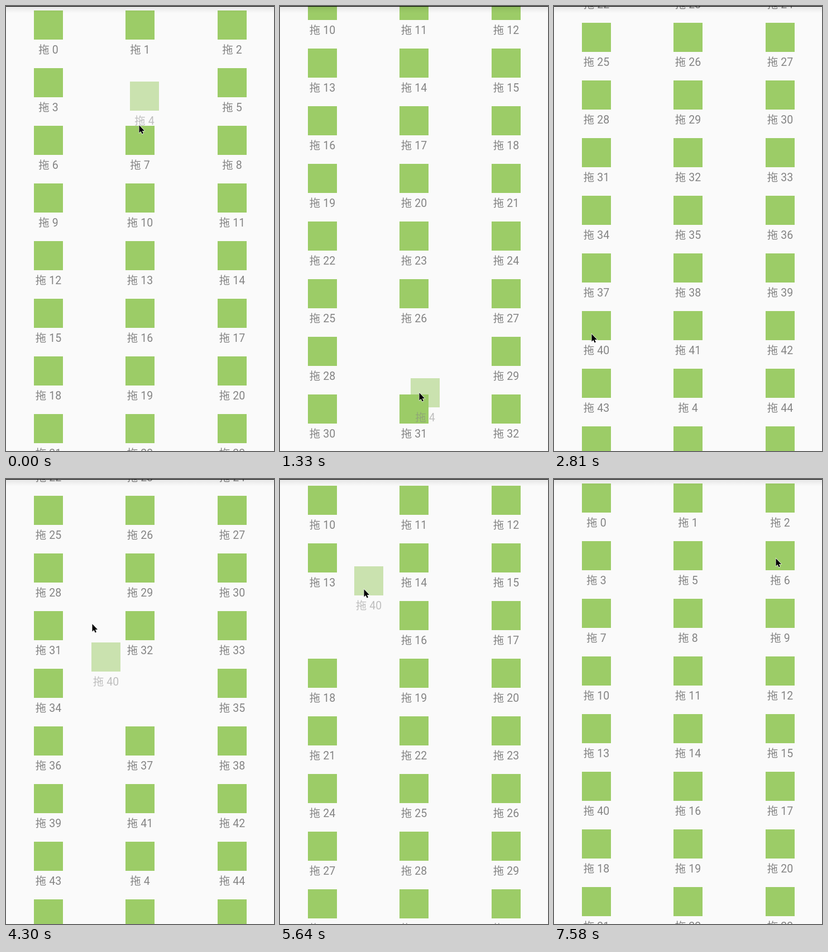
Recreate the animation shown at these times as an HTML page. Size 480 px wide and 795 px high, loop 8000 ms.

```html
<!DOCTYPE html>
<html lang="zh-CN">
<head>
<meta charset="utf-8">
<title>Drag grid</title>
<style>
  html, body { margin: 0; width: 100%; height: 100%; overflow: hidden; background: #fafafa; }
  #stage { position: relative; width: 480px; height: 795px; overflow: hidden; background: #fafafa; }
  .cell { position: absolute; left: 0; top: 0; width: 52px; height: 95px; }
  .cell::before { content: ""; position: absolute; left: 0; top: 8px; width: 52px; height: 52px; background: #9ccc67; }
  .cell span {
    position: absolute; left: -14px; top: 67px; width: 80px;
    font: 19.5px/24px Roboto, "Noto Sans CJK SC", "Noto Sans CJK", sans-serif;
    text-align: center; white-space: nowrap; color: #848484;
  }
  .ghost { opacity: .5; z-index: 1; }
  #bar {
    position: absolute; z-index: 2; left: 0; top: 0; width: 100%; height: 13px;
    background: linear-gradient(#000 1px, rgba(0,0,0,.25) 1px 2px, rgba(0,0,0,.08) 2px, rgba(0,0,0,.03) 8px, transparent);
  }
  #cursor { position: absolute; z-index: 3; left: 0; top: 0; overflow: visible; }
</style>
</head>
<body>
<div id="stage">
  <div id="bar"></div>
  <svg id="cursor" width="14" height="20">
    <path d="M.5 1V14.5L3.6 11.7L5.7 16.6L7.9 15.6L5.8 10.9H10Z" fill="#000" stroke="#fff" stroke-width="1.2" paint-order="stroke"/>
  </svg>
</div>
<script>
const LOOP = 8000, STEP = 148.3, LAST = 51, COUNT = 51;
const ROW = 103, COL = 164.5, LEFT = 50;
const stage = document.getElementById('stage');
const cursor = document.getElementById('cursor');

const linear = u => u;
const smooth = u => u * u * (3 - 2 * u);

// Chains moves { from, to, end } (in steps); each starts where the last one ended.
function chain(start, moves, ease) {
  return n => moves.reduce((pos, m) => {
    const u = Math.min(1, Math.max(0, (n - m.from) / (m.to - m.from)));
    return pos.map((v, i) => v + (m.end[i] - v) * ease(u));
  }, start);
}

const pointer = chain([237, 150], [
  { from: -1.6, to: 6, end: [249, 690] },
  { from: 15, to: 19, end: [67, 585] },
  { from: 26, to: 28, end: [170, 332] },
  { from: 28, to: 29.9, end: [141, 195] },
  { from: 35, to: 37, end: [150, 196] },
  { from: 44, to: 51, end: [397, 141] }
], smooth);

const scroll = chain([0], [
  { from: 5.3, to: 13.92, end: [802] },
  { from: 31.55, to: 38, end: [305] },
  { from: 38, to: 41, end: [0] }
], linear);

// The gap follows the pointer until step "settle"; dx, dy lead from pointer to cell corner.
const drags = [
  { item: 4, from: 0, settle: 14, drop: 14, dx: -15, dy: -33 },
  { item: 40, from: 25, settle: 38, drop: 45, dx: -17, dy: -48 }
];

const cells = Array.from({ length: COUNT }, (_, i) => {
  const el = document.createElement('div');
  el.className = 'cell';
  el.innerHTML = `<span>拖 ${i}</span>`;
  return stage.appendChild(el);
});

function place(el, x, y) {
  el.style.transform = `translate(${Math.round(x)}px, ${Math.round(y)}px)`;
}

// Slot under the slightly delayed pointer.
function slotAt(n) {
  const [x, y] = pointer(n - .6), [top] = scroll(n - .6);
  return 3 * Math.floor((y + top + 20) / ROW) + Math.floor(x / 160);
}

function render(n) {
  const order = cells.map((_, i) => i);
  for (const d of drags) {
    if (n < d.from) continue;
    order.splice(order.indexOf(d.item), 1);
    order.splice(slotAt(Math.min(n, d.settle)), 0, d.item);
  }

  const [top] = scroll(n);
  order.forEach((item, i) =>
    place(cells[item], Math.floor(LEFT + COL * (i % 3)), ROW * Math.floor(i / 3) - top));

  // The ghost trails the pointer by one step.
  const [gx, gy] = pointer(n - 1);
  for (const d of drags) {
    const held = n >= d.from && n < d.drop;
    cells[d.item].classList.toggle('ghost', held);
    if (held) place(cells[d.item], gx + d.dx, gy + d.dy);
  }
  place(cursor, ...pointer(n));
}

const start = performance.now();
let shown = -1;
function tick() {
  const t = (performance.now() - start) % LOOP;
  const n = Math.min(LAST, Math.floor((t + 10) / STEP));
  if (n !== shown) render(shown = n);
  requestAnimationFrame(tick);
}
tick();
</script>
</body>
</html>
```
